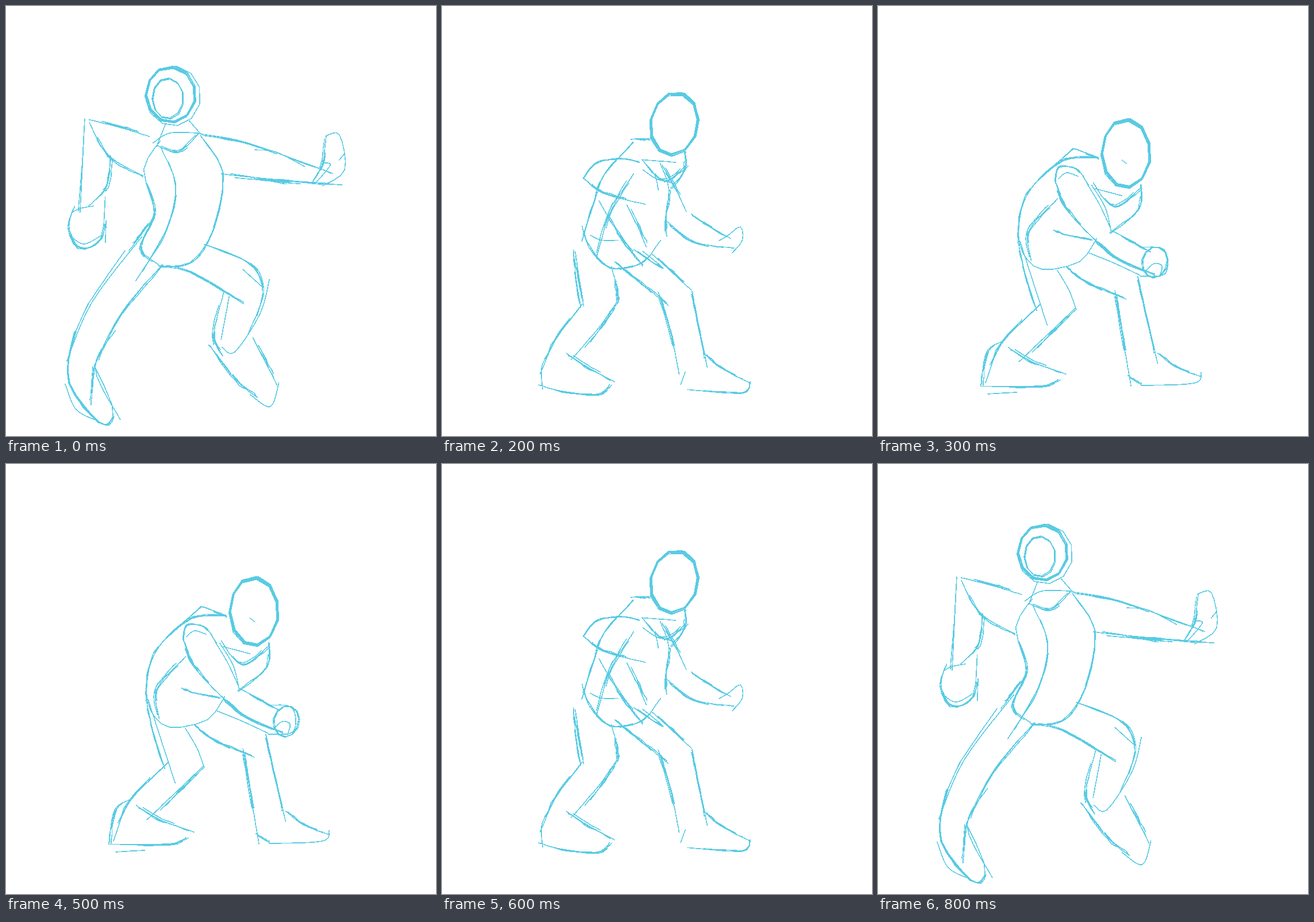
An HTML page for the animation above (0.9 s loop, 748x748 px).

```html
<!DOCTYPE html>
<html lang="en">
<head>
<meta charset="utf-8">
<title>Sketch loop</title>
<style>
html, body { margin: 0; width: 100%; height: 100%; overflow: hidden; background: #fff; }
svg { display: block; width: 100%; height: 100%; }
path { fill: none; stroke: #5acbe3; stroke-width: 1.6; stroke-linecap: round; stroke-linejoin: round; }
</style>
</head>
<body>
<svg id="stage" viewBox="0 0 748 748" shape-rendering="crispEdges"></svg>
<script>
const stage = document.getElementById('stage');
const STEP = 100;
const SAMPLES = 12;
let strokes = [];

// Even samples of a smooth curve through the given points
function sample(xy) {
  const last = xy.length / 2 - 1;
  const at = (i, k) => xy[2 * Math.max(0, Math.min(last, i)) + k];
  return Array.from({ length: SAMPLES + 1 }, (_, n) => {
    const u = n / SAMPLES * last, i = Math.min(Math.floor(u), last - 1), t = u - i;
    return [0, 1].map(k => {
      const a = at(i - 1, k), b = at(i, k), c = at(i + 1, k), d = at(i + 2, k);
      return b + t / 2 * (c - a + t * (2 * a - 5 * b + 4 * c - d + t * (3 * (b - c) + d - a)));
    });
  });
}

const add = (passes, spread, pts, closed) => strokes.push({ passes, spread, pts, closed });
const thin = (...xy) => add(1, 1, sample(xy));
const rough = (...xy) => add(4, 5, sample(xy));

function ring(x, y, rx, ry, tilt, passes) {
  const c = Math.cos(tilt), s = Math.sin(tilt);
  add(passes, 4, Array.from({ length: SAMPLES + 2 }, (_, i) => {
    const a = i * 2 * Math.PI / SAMPLES - 2;
    const u = rx * Math.cos(a), v = ry * Math.sin(a);
    return [x + u * c - v * s, y + u * s + v * c];
  }), true);
}

function kickBody() {
  ring(286, 155, 43, 48, 0, 6);
  ring(291, 157, 48, 52, 0, 1);
  ring(281, 160, 27, 35, 0, 2);
  thin(278, 204, 262, 244);
  thin(319, 200, 338, 222);
  thin(256, 238, 285, 221, 334, 221);
  rough(262, 242, 300, 253, 334, 222);
  rough(268, 236, 239, 285, 258, 358, 233, 420, 265, 451);
  rough(268, 245, 294, 312, 278, 390, 225, 478);
  rough(338, 226, 377, 290, 362, 385, 320, 446, 265, 452);
}

function kickArms() {
  rough(144, 197, 200, 211, 248, 226);
  rough(146, 203, 178, 260, 239, 296);
  thin(137, 197, 133, 270, 126, 356);
  thin(137, 197, 129, 359);
  rough(183, 262, 175, 315, 144, 349);
  thin(117, 358, 130, 352, 152, 348);
  rough(120, 348, 108, 385, 126, 422, 165, 405, 173, 332);
  thin(110, 398, 135, 414, 164, 400);
  thin(174, 374, 173, 411);
  rough(334, 222, 420, 238, 568, 291);
  thin(433, 250, 470, 254, 519, 279);
  rough(374, 293, 470, 303, 584, 312);
  rough(390, 292, 495, 308);
  rough(533, 305, 550, 275, 556, 226);
  thin(556, 226, 580, 224, 589, 285, 550, 313);
  thin(552, 273, 564, 277, 540, 306);
  thin(588, 258, 580, 268);
}

function kickLegs() {
  rough(256, 370, 215, 425);
  thin(236, 402, 150, 515, 106, 618);
  rough(208, 426, 132, 540, 108, 650, 165, 728, 188, 705, 156, 630);
  rough(272, 450, 200, 535, 154, 626);
  rough(154, 626, 148, 694);
  thin(190, 565, 155, 630, 199, 720);
  thin(103, 658, 122, 702, 160, 722);
  rough(345, 414, 425, 448, 446, 500, 420, 572);
  thin(412, 458, 444, 487);
  thin(458, 476, 442, 535, 398, 602, 376, 594);
  rough(268, 453, 320, 464, 413, 518);
  rough(378, 498, 361, 570, 376, 608);
  thin(388, 506, 374, 580);
  rough(354, 590, 400, 650, 438, 681);
  thin(425, 676, 460, 697, 475, 655);
  rough(430, 576, 472, 658);
}

function strideBody() {
  ring(376, 154, 42, 52, 0.42, 8);
  rough(340, 198, 318, 216);
  rough(387, 196, 395, 240);
  rough(322, 226, 360, 259, 395, 236);
  thin(318, 217, 388, 214);
  rough(326, 226, 290, 280, 278, 335, 243, 406);
  rough(354, 248, 325, 320, 270, 434);
  rough(394, 240, 411, 305, 384, 380, 376, 414);
  rough(378, 412, 345, 450, 300, 455, 258, 410, 243, 376);
}

function strideArms() {
  rough(183, 292, 240, 257, 318, 231);
  rough(183, 293, 235, 300, 330, 284);
  rough(190, 290, 197, 350, 218, 436);
  rough(239, 302, 243, 360, 238, 410);
  thin(210, 408, 224, 416, 240, 408);
  rough(214, 430, 241, 474, 266, 444, 244, 385);
  rough(395, 242, 420, 290, 446, 328);
  thin(421, 266, 448, 326, 450, 350, 408, 348);
  thin(396, 250, 413, 300, 405, 345);
  rough(446, 328, 490, 358, 530, 382);
  rough(408, 345, 460, 380, 536, 376);
  thin(498, 356, 524, 344, 550, 320, 550, 360, 520, 388);
}

function strideLegs() {
  rough(213, 442, 206, 518);
  rough(276, 448, 268, 500);
  rough(205, 614, 245, 642, 272, 667);
  rough(157, 656, 170, 676, 250, 690, 272, 668);
  rough(214, 444, 197, 490);
  thin(155, 625, 157, 656, 170, 673);
  rough(206, 518, 180, 575, 155, 625);
  rough(268, 500, 250, 550, 205, 613);
  rough(366, 436, 414, 522);
  rough(274, 436, 325, 480, 356, 532);
  rough(418, 522, 437, 636);
  rough(340, 500, 372, 570, 385, 622);
  rough(428, 608, 450, 630, 511, 668);
  rough(511, 668, 490, 690, 395, 673);
  thin(393, 672, 388, 615);
}

// Same order of parts as the stride, so that the two can be blended
function crouchBody() {
  ring(431, 257, 42, 59, 0, 8);
  rough(384, 264, 340, 248);
  rough(457, 310, 453, 355, 405, 395);
  rough(374, 306, 410, 348, 457, 316);
  thin(378, 318, 424, 330);
  rough(340, 248, 276, 306, 250, 350, 243, 412);
  rough(312, 335, 262, 390, 266, 442);
  thin(364, 310, 385, 345, 405, 388);
  thin(380, 405, 350, 445, 285, 458, 252, 430, 243, 390);
}

function crouchArms() {
  rough(308, 308, 314, 281, 345, 283, 364, 310);
  rough(308, 305, 325, 350, 374, 404);
  rough(358, 388, 415, 437, 482, 467);
  thin(405, 390, 440, 408, 474, 428);
  rough(306, 389, 330, 398, 372, 407);
  thin(456, 420, 498, 424, 500, 466, 456, 470);
  thin(372, 312, 395, 350, 405, 388);
  rough(278, 304, 325, 268, 384, 264);
  thin(314, 300, 328, 290, 348, 296);
  rough(424, 402, 474, 428);
  rough(374, 404, 420, 441, 480, 466);
  thin(466, 460, 480, 448, 494, 452, 490, 470);
}

function crouchLegs() {
  rough(243, 408, 255, 465, 276, 531);
  thin(312, 460, 332, 494, 344, 526);
  rough(226, 594, 270, 620, 326, 640);
  rough(178, 661, 240, 661, 290, 660, 316, 650);
  thin(247, 410, 294, 555);
  rough(216, 584, 190, 602, 180, 660);
  rough(283, 518, 215, 588, 188, 655);
  rough(344, 526, 246, 620);
  thin(368, 430, 410, 447, 455, 468);
  rough(328, 454, 366, 482, 432, 510);
  rough(452, 470, 487, 622);
  rough(412, 496, 440, 662);
  rough(486, 604, 518, 628, 562, 645);
  thin(562, 638, 550, 656, 458, 660);
  rough(437, 645, 458, 658);
  thin(191, 675, 241, 672);
  thin(424, 268, 432, 274);
}

function collect(...parts) {
  strokes = [];
  parts.forEach(part => part());
  return strokes;
}

const blend = (from, to, t) => from.map((s, i) => ({
  ...s,
  pts: s.pts.map((p, n) => p.map((v, k) => v + (to[i].pts[n][k] - v) * t))
}));

function random(seed) {
  return () => (seed = (seed * 1664525 + 1013904223) >>> 0) / 4294967296;
}

// The first pass draws the whole line, later ones go over a piece of it
function sketch({ passes, spread, pts, closed }, seed) {
  const rnd = random(seed);
  const off = amp => (rnd() - 0.5) * amp;
  let d = '';
  for (let p = 0; p < passes; p++) {
    const amp = p ? spread : spread * 0.4;
    const from = p && !closed ? Math.floor(rnd() * 7) : 0;
    const part = p && !closed ? pts.slice(from, from + 7) : pts;
    const dx = off(amp), dy = off(amp);
    const xy = part.flatMap(([x, y]) => [x + dx + off(amp * 0.4), y + dy + off(amp * 0.4)]);
    d += 'M' + sample(xy).map(q => q.map(v => v.toFixed(1)).join(' ')).join('L');
  }
  return d;
}

function build(list) {
  const path = document.createElementNS('http://www.w3.org/2000/svg', 'path');
  path.setAttribute('d', list.map((s, i) => sketch(s, 97 + i * 7919)).join(''));
  return stage.appendChild(path);
}

const kick = collect(kickBody, kickArms, kickLegs);
const stride = collect(strideBody, strideArms, strideLegs);
const crouch = collect(crouchBody, crouchArms, crouchLegs);
const grip = n => collect(() => ring(482 + 3 * n, 445 + n, 22, 27, 0.2, 2));

const down = [kick, stride, blend(stride, crouch, 0.5)].map(build);
const hold = [0, 1, 2].map(n => build([...crouch, ...grip(n)]));
const order = [...down, ...hold, ...down.slice().reverse()];

function render(time) {
  const now = order[Math.floor(time / STEP) % order.length];
  for (const path of stage.children) path.style.display = path === now ? '' : 'none';
}

function tick() {
  render(performance.now());
  requestAnimationFrame(tick);
}
render(0);
requestAnimationFrame(tick);
</script>
</body>
</html>
```
